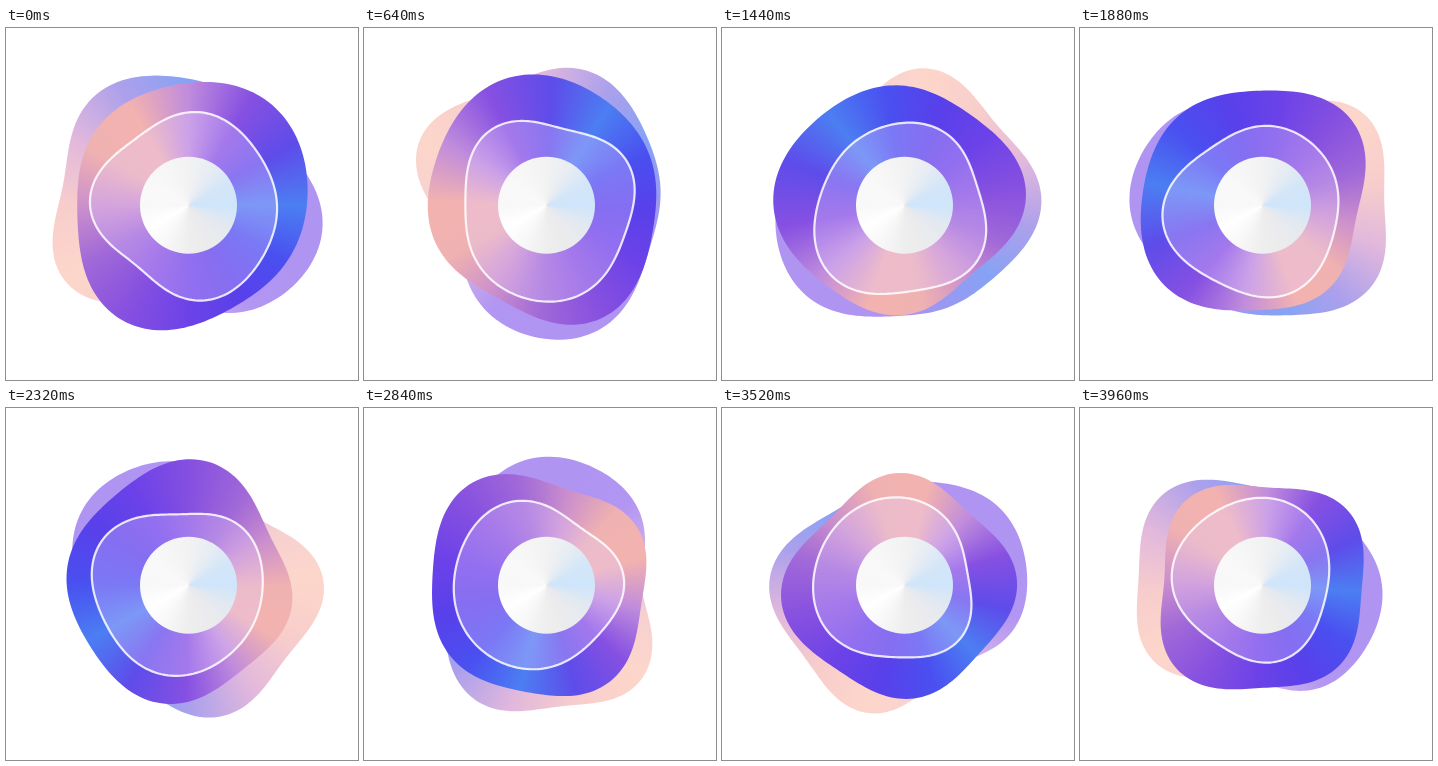
An HTML page with a canvas for the animation above (4000 ms loop, 352 by 352 pixels).

```html
<!DOCTYPE html>
<html lang="en">
<head>
<meta charset="utf-8">
<title>Turning blobs</title>
<style>
  html, body { margin: 0; width: 100%; height: 100%; overflow: hidden; background: #fff; }
  canvas { display: block; width: 352px; height: 352px; }
</style>
</head>
<body>
<canvas id="stage"></canvas>
<script>
const SIZE = 352, LOOP = 4000, CX = 182.5, CY = 177.3;
const { PI, sin, cos } = Math;
const canvas = document.getElementById('stage');
const ctx = canvas.getContext('2d');
const dpr = window.devicePixelRatio || 1;
canvas.width = canvas.height = SIZE * dpr;
ctx.scale(dpr, dpr);

const rad = deg => deg * PI / 180;
const mix = (a, b, u) => a + (b - a) * u;
const arch = u => sin(PI * u);

// A blob is a turning circle that shrinks, drifts off centre and carries a few waves.
// Angles are in degrees, clockwise from the top of the turned shape.
const wave = (count, from, to, angle, turn = 0) => ({ count, from, to, angle, turn });

const back = {
  turn: 360,
  radius: [126, 115],
  drift: u => ({ reach: 8 - 5 * arch(u), angle: mix(-46, -100, u) }),
  waves: [wave(2, 11, 14, 108), wave(3, 10, 2.5, -6), wave(4, 5, 6, 55), wave(5, 4, 4, 23)],
  colors: ['#86a2f4', '#9a98f2', '#b094f2', '#b094f2', '#b094f2', '#b296f2',
    '#d4b4e8', '#f6d0d0', '#fdd6ca', '#f7cdcc', '#e2b8dc', '#aca0ec']
};

const front = {
  turn: -360,
  radius: [120.5, 107],
  drift: u => ({ reach: 2 + 9 * arch(u), angle: mix(10, 220, u) }),
  waves: [wave(2, 8, 2, 32), wave(3, 3.5, 2, -38), wave(4, 3, 7.5, 34, 10)],
  colors: ['#c08cdc', '#8650e2', '#5e4cea', '#4c7ef2', '#4a50f0', '#5840ea',
    '#6c42e8', '#8650e0', '#a068d8', '#cc90cc', '#f0b2b0', '#f2b2b0']
};

const ring = {
  turn: 360,
  radius: [90, 79],
  drift: u => ({ reach: 12 * sin(2 * u), angle: mix(155, -51, u) }),
  waves: [wave(2, 2.5, 2.5, -45, -145), wave(3, 5, 4, 32, -112), wave(4, 3.5, 1, 0)]
};

const discColors = ['#f2f2f2', '#e8edf3', '#d4e6f8', '#cfe5fb', '#e4e9f0', '#ebebed',
  '#eeeeee', '#f7f7f7', '#ffffff', '#f8f8f8', '#f9f9f9', '#f6f6f6'];

function blobPath(blob, u) {
  const { reach, angle } = blob.drift(u);
  const path = new Path2D();
  for (let deg = 0; deg < 360; deg += 2) {
    let r = mix(...blob.radius, u) + reach * cos(rad(deg - angle));
    for (const w of blob.waves) {
      r += mix(w.from, w.to, u) * cos(w.count * rad(deg - w.angle - w.turn * u));
    }
    const a = rad(deg + blob.turn * u);
    path.lineTo(CX + r * sin(a), CY - r * cos(a));
  }
  path.closePath();
  return path;
}

// Evenly spaced colours around the centre, the first one at the top.
function conic(colors, turn = 0) {
  const g = ctx.createConicGradient(rad(turn - 90), CX, CY);
  [...colors, colors[0]].forEach((c, i) => g.addColorStop(i / colors.length, c));
  return g;
}

function draw(u) {
  ctx.fillStyle = '#fff';
  ctx.fillRect(0, 0, SIZE, SIZE);

  for (const blob of [back, front]) {
    ctx.fillStyle = conic(blob.colors, blob.turn * u);
    ctx.fill(blobPath(blob, u));
  }

  const line = blobPath(ring, u);
  ctx.fillStyle = 'rgba(228, 204, 255, 0.32)';
  ctx.fill(line);
  ctx.strokeStyle = 'rgba(255, 255, 255, 0.85)';
  ctx.lineWidth = 2.2;
  ctx.stroke(line);

  ctx.fillStyle = conic(discColors);
  ctx.beginPath();
  ctx.arc(CX, CY, 48.5, 0, 2 * PI);
  ctx.fill();
}

const start = performance.now();
function tick() {
  draw((performance.now() - start) % LOOP / LOOP);
  requestAnimationFrame(tick);
}
tick();
</script>
</body>
</html>
```
